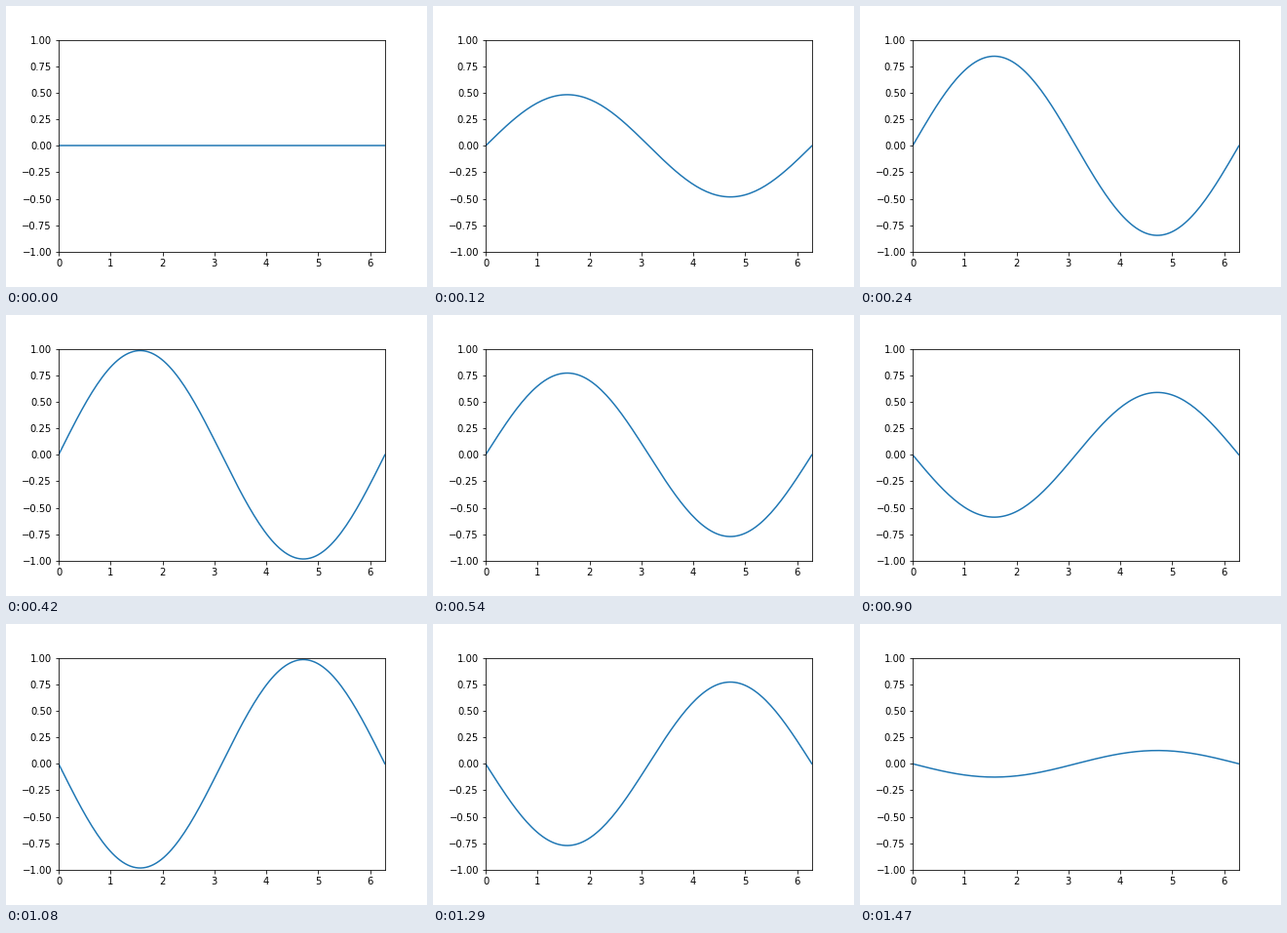
A matplotlib script for the animation above (1.5 s loop, 432 by 288 pixels).

```python
import numpy as np
import matplotlib.pyplot as plt
from matplotlib.animation import FuncAnimation

FRAMES = 50
INTERVAL = 30  # ms

plt.rcParams["font.family"] = "DejaVu Sans"
plt.rcParams["font.size"] = 10

fig, ax = plt.subplots(figsize=(6, 4), dpi=72, facecolor="white")
fig.subplots_adjust(left=0.125, right=0.9, bottom=0.125, top=0.88)
ax.set_xlim(0, 2 * np.pi)
ax.set_ylim(-1, 1)

x = np.linspace(0, 2 * np.pi, 128)
line, = ax.plot(x, np.zeros_like(x), color="tab:blue", lw=1.5)


def update(i):
    """Standing wave whose amplitude swings once per loop."""
    line.set_ydata(np.sin(2 * np.pi * i / FRAMES) * np.sin(x))
    return line,


anim = FuncAnimation(fig, update, frames=FRAMES, interval=INTERVAL,
                     repeat=True, repeat_delay=0)
plt.show()
```
